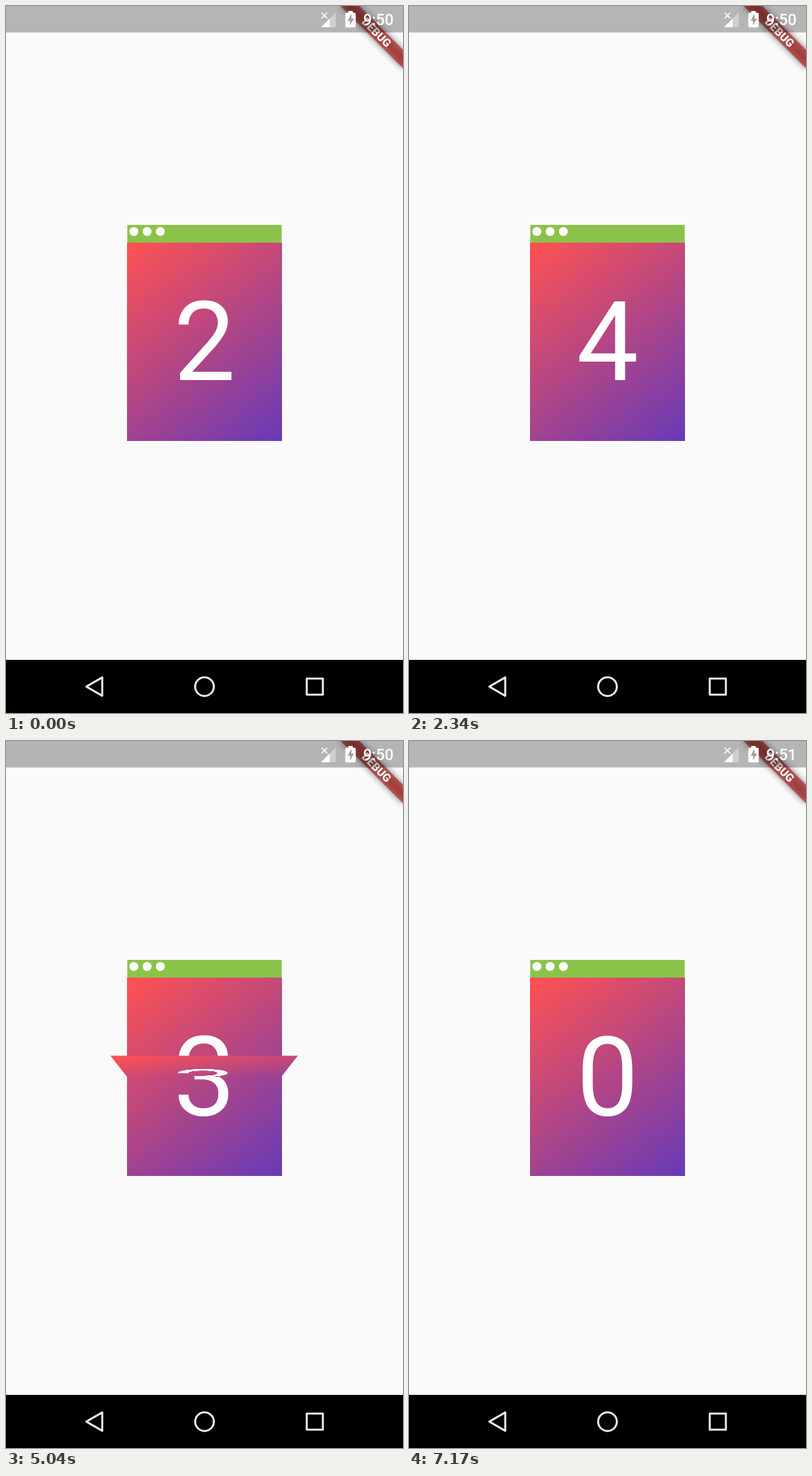
Animation, 561 px wide and 998 px high, one loop 7.21 s. Source, as an HTML page:

```html
<!DOCTYPE html>
<html lang="en">
<head>
<meta charset="utf-8">
<title>Flip counter</title>
<style>
  html, body { margin: 0; width: 100%; height: 100%; overflow: hidden; background: #fafafa; }
  #stage { position: relative; width: 561px; height: 998px; overflow: hidden; background: #fafafa; font-family: Roboto, sans-serif; }
  svg { position: absolute; left: 0; top: 0; }
  .half { position: absolute; left: 171.4px; width: 218.2px; height: 140px; overflow: hidden; }
  .top { top: 334px; transform-origin: 50% 100%; }
  .bottom { top: 474px; transform-origin: 50% 0; }
  .face {
    position: absolute; left: 0; top: 0; width: 100%; height: 280px;
    background: linear-gradient(142.1deg, #ff5252, #673ab7);
    color: #fff; font-size: 155.8px; line-height: 281px; text-align: center;
  }
  .bottom .face { top: -140px; }
</style>
</head>
<body>
<div id="stage">
  <svg width="561" height="998">
    <rect x="171.4" y="309" width="218.2" height="25" fill="#8bc34a"/>
    <g fill="#fff">
      <circle cx="180.7" cy="318.2" r="6.3"/>
      <circle cx="199.4" cy="318.2" r="6.3"/>
      <circle cx="218.1" cy="318.2" r="6.3"/>
    </g>
  </svg>

  <div class="half top" id="top"><div class="face"></div></div>
  <div class="half bottom" id="bottom"><div class="face"></div></div>
  <div class="half top" id="flap"><div class="face"></div></div>

  <svg width="561" height="998">
    <defs>
      <filter id="soft" x="-30%" y="-150%" width="160%" height="400%"><feGaussianBlur stdDeviation="5"/></filter>
    </defs>
    <!-- corner ribbon -->
    <g transform="translate(561 0) rotate(45)">
      <rect x="-62.3" y="43.6" width="124.6" height="18.7" fill="#000" fill-opacity=".5" filter="url(#soft)"/>
      <rect x="-62.3" y="43.6" width="124.6" height="18.7" fill="#b71c1c" fill-opacity=".63"/>
      <text y="58.4" font-size="15.9" font-weight="900" text-anchor="middle" fill="#fff">DEBUG</text>
    </g>
    <!-- status bar -->
    <rect width="561" height="37.4" fill="#000" fill-opacity=".28"/>
    <g fill="#fff">
      <path d="M445 30L457.5 17.5V30Z"/>
      <path d="M457.5 17.5V30H466V9Z" fill-opacity=".35"/>
      <path d="M446 9.5L454 17.5M454 9.5L446 17.5" stroke="#fff" stroke-width="1.7"/>
      <path fill-rule="evenodd" d="M483.5 9.5V7H490V9.5H492.8Q494.2 9.5 494.2 11V28.7Q494.2 30.2 492.8 30.2H480.9Q479.5 30.2 479.5 28.7V11Q479.5 9.5 480.9 9.5ZM488 12L482.5 21H486V27.5L491.5 18H488Z"/>
      <text id="clock" x="504.7" y="27" font-size="21.8" font-weight="500">9:50</text>
    </g>
    <!-- navigation bar -->
    <rect y="923" width="561" height="75" fill="#000"/>
    <g fill="none" stroke="#eee" stroke-width="2.8" stroke-linejoin="round">
      <path d="M113.5 960.8L136 947.8V973.8Z"/>
      <circle cx="280.5" cy="960.8" r="13.2"/>
      <rect x="425" y="949.4" width="22.8" height="22.8"/>
    </g>
  </svg>
</div>

<script>
  const LOOP = 7210, FIRST = 919, PERIOD = 780, FLIP = 500, MINUTE = 5700;
  const DIGITS = [2, 3, 4, 5, 4, 3, 2, 1, 0];
  const [top_, bottom, flap, clock] = ['top', 'bottom', 'flap', 'clock'].map(id => document.getElementById(id));

  function setText(el, text) {
    if (el.textContent !== String(text)) el.textContent = text;
  }

  // The upper leaf falls from `high` to `low` as p goes from 0 to 1.
  function pose(high, low, p) {
    const falling = p < 0.5;
    const angle = falling ? -180 * p : 180 * (1 - p);
    setText(top_.firstChild, low);
    setText(bottom.firstChild, high);
    setText(flap.firstChild, falling ? high : low);
    flap.className = falling ? 'half top' : 'half bottom';
    flap.style.visibility = 'visible';
    flap.style.transform = `perspective(779px) rotateX(${angle}deg)`;
  }

  function rest(digit) {
    setText(top_.firstChild, digit);
    setText(bottom.firstChild, digit);
    flap.style.visibility = 'hidden';
  }

  function draw() {
    const t = performance.now() % LOOP;
    const step = Math.floor((t - FIRST) / PERIOD);
    const p = (t - FIRST - step * PERIOD) / FLIP;
    const from = DIGITS[step], to = DIGITS[step + 1];

    if (step < 0) rest(DIGITS[0]);
    else if (to === undefined) rest(DIGITS[DIGITS.length - 1]);
    else if (p >= 1) rest(to);
    else if (to < from) pose(from, to, p);
    else pose(to, from, 1 - p);

    setText(clock, t < MINUTE ? '9:50' : '9:51');
    requestAnimationFrame(draw);
  }
  draw();
</script>
</body>
</html>
```
